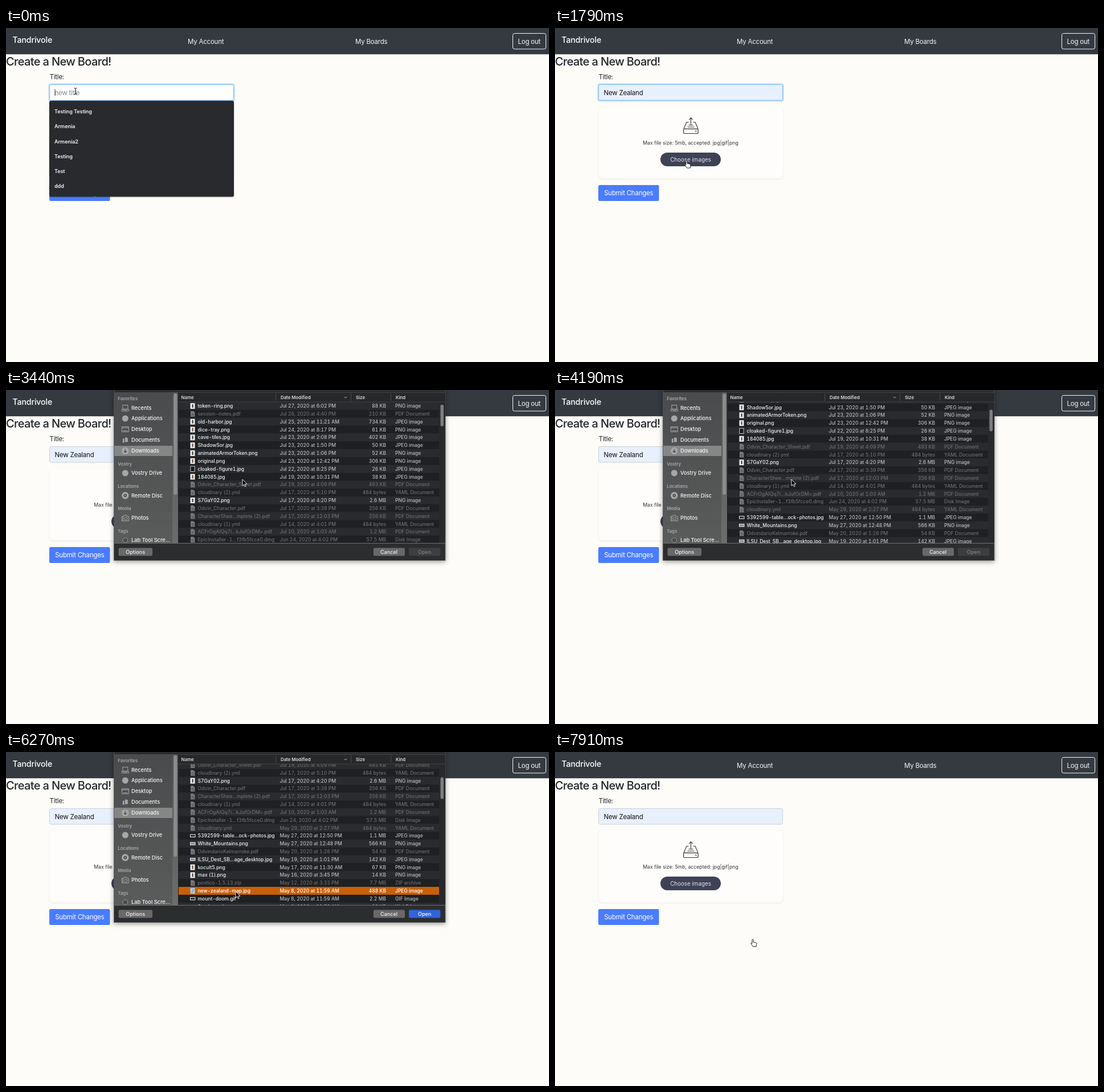
Animation, 953 px wide and 587 px high, one loop 8 s. Source, as an HTML page:

```html
<!DOCTYPE html>
<html lang="en">
<head>
<meta charset="utf-8">
<title>Create a New Board</title>
<style>
  html, body { margin: 0; width: 100%; height: 100%; overflow: hidden; background: #fdfcf8; }
  svg { display: block; width: 100vw; height: 100vh; }
  text { font-family: Inter, Roboto, sans-serif; font-optical-sizing: none; white-space: pre; }
  .ui { font-size: 11.5px; letter-spacing: -.22px; }
  .brand { font-size: 14.1px; font-weight: 500; letter-spacing: -.1px; }
  .head { font-size: 20px; font-weight: 500; letter-spacing: -.64px; }
  .note { font-size: 8.7px; }
  .pill { font-size: 9.8px; }
  .opt { font-size: 9px; font-weight: 600; letter-spacing: -.05px; }
  .side { font-size: 9.2px; font-weight: 500; }
  .sec { font-size: 7.8px; font-weight: 600; }
  .col { font-size: 7.8px; font-weight: 600; }
  .row { font-size: 8.55px; font-weight: 500; font-variant-numeric: tabular-nums; letter-spacing: -.03px; }
  .btn { font-size: 9.1px; font-weight: 500; }
  #dialog { filter: drop-shadow(0 2px 4px rgba(0, 0, 0, .4)); }
  #card { filter: drop-shadow(0 1px 1.5px rgba(0, 0, 0, .08)); }
</style>
</head>
<body>
<svg id="stage" viewBox="0 0 953 587" preserveAspectRatio="none"></svg>
<script>
const LOOP = 8000, TICK = 149.2, ROW = 13.82, TOP = 21.3, PICKED = 27;
const stage = document.getElementById('stage');
const $ = id => document.getElementById(id);

const rect = (x, y, w, h, fill, extra = '') =>
  `<rect x="${x}" y="${y}" width="${w}" height="${h}" fill="${fill}" ${extra}/>`;
const line = (d, color, width = 1, extra = '') =>
  `<path d="${d}" fill="none" stroke="${color}" stroke-width="${width}" ${extra}/>`;
const fade = (id, from, to) =>
  `<linearGradient id="${id}" x2="0" y2="1"><stop stop-color="${from}"/><stop offset="1" stop-color="${to}"/></linearGradient>`;
const sizes = { ui: 11.5, brand: 14.1, head: 20, note: 8.7, pill: 9.8, opt: 9, side: 9.2, sec: 7.8, col: 7.8, row: 8.55, btn: 9.1 };
// Text placed by the vertical centre of its capitals
const text = (x, cy, str, cls, fill, extra = '') =>
  `<text x="${x}" y="${(cy + sizes[cls] * .36).toFixed(2)}" class="${cls}" fill="${fill}" ${extra}>${str}</text>`;
const MID = 'text-anchor="middle"', END = 'text-anchor="end"';

const files = `board-draft.png|Jul 28|9:14 AM|1.3 MB
token-ring.png|Jul 27|6:02 PM|88 KB
session-notes.pdf|Jul 26|4:40 PM|210 KB
old-harbor.jpg|Jul 25|11:21 AM|734 KB
dice-tray.png|Jul 24|8:17 PM|61 KB
cave-tiles.jpg|Jul 23|2:08 PM|402 KB
ShadowSor.jpg|Jul 23|1:50 PM|50 KB
animatedArmorToken.png|Jul 23|1:06 PM|52 KB
original.png|Jul 23|12:42 PM|306 KB
cloaked-figure1.jpg|Jul 22|8:25 PM|26 KB
184085.jpg|Jul 19|10:31 PM|38 KB
Odvin_Character_Sheet.pdf|Jul 19|4:09 PM|493 KB
cloudinary (2).yml|Jul 17|5:10 PM|484 bytes
S7GaY02.png|Jul 17|4:20 PM|2.6 MB
Odvin_Character.pdf|Jul 17|3:39 PM|356 KB
CharacterShee…mplete (2).pdf|Jul 17|12:03 PM|356 KB
cloudinary (1).yml|Jul 14|4:01 PM|484 bytes
ACFrOgAIQq7i…kJufOrDM=.pdf|Jul 10|1:03 AM|1.2 MB
EpicInstaller-1…f3fb5fcce0.dmg|Jun 24|4:02 PM|57.5 MB
cloudinary.yml|May 29|2:27 PM|484 bytes
5392599-table…ock-photos.jpg|May 27|12:50 PM|1.1 MB
White_Mountains.png|May 27|12:48 PM|566 KB
OdvindarioKelmarroke.pdf|May 20|1:28 PM|54 KB
ILSU_Dest_SB…age_desktop.jpg|May 19|1:01 PM|142 KB
kocult5.png|May 17|11:30 AM|67 KB
max (1).png|May 16|3:45 PM|14 KB
postico-1.5.13.zip|May 12|3:33 PM|7.7 MB
new-zealand-map.jpg|May 8|11:59 AM|488 KB
mount-doom.gif|May 8|11:59 AM|2.2 MB
Sender.webp|May 8|11:59 AM|66 KB`.split('\n').map(s => s.split('|'));

const kinds = {
  jpg: 'JPEG image', png: 'PNG image', gif: 'GIF Image', webp: 'WebP image',
  pdf: 'PDF Document', yml: 'YAML Document', dmg: 'Disk Image', zip: 'ZIP archive'
};

function fileIcon(i, cy, isImage) {
  if (!isImage)
    return `<path d="M324 ${cy - 5}h5l2.5 2.5v7.5h-7.5z" fill="#77787b"/>` +
      line(`M325.5 ${cy}h4.5m-4.5 2.5h4.5`, '#47484b', .8);
  if (i === PICKED) return rect(323.5, cy - 5, 8, 10, '#a9cdea') + line(`M329 ${cy - 3}l-1 3-2 3`, '#6d93b5', 1.3);
  if (i > 19 && i < 24 || i > 27)
    return rect(323, cy - 2.7, 9.5, 5.4, '#eee') + rect(324, cy - 1.6, 7.5, 3.2, i % 2 ? '#7c8c98' : '#2a2422');
  return rect(323.5, cy - 5, 8, 10, '#f1f1f1') +
    (i === 9 ? rect(324.3, cy - 4.2, 6.4, 8.4, '#17181a') : rect(326.5, cy - 3, 2.2, 6, i % 2 ? '#3d3d40' : '#6b4a3c'));
}

function fileRow([name, day, time, size], i) {
  const cy = TOP + 7 + i * ROW, ext = name.split('.').pop();
  const isImage = /jpg|png|gif|webp/.test(ext), mark = i === PICKED ? ' data-sel="1"' : '';
  const main = isImage ? '#f0f0f0' : '#6b6c6f', sub = isImage ? '#b9babd' : '#6b6c6f';
  const cell = (x, str, fill, extra = '') => text(x, cy, str, 'row', fill, extra + mark);
  return fileIcon(i, cy, isImage) + cell(336.5, name, main) +
    cell(480.5, `${day}, 2020 at ${time}`, sub) + cell(667, size, sub, END) + cell(683, kinds[ext], sub);
}

const icons = {
  recents: '<path d="M-4.5-5h9v7h-9zM-6 2.5h3l1 1.5h4l1-1.5h3v3h-12z"/>',
  dot: '<circle r="5.5" fill="currentColor" stroke="none"/>',
  desktop: '<path d="M-6-4.5h12v9h-12zM-6-2.5h12M-4 2.5h8"/>',
  docs: '<path d="M-5-3h4v8h-4zM-1-5h4l2 2v7h-6z" fill="currentColor" stroke="#3c3d3f" stroke-width=".7"/>',
  down: '<circle r="6.2" fill="currentColor" stroke="none"/><path d="M0-3.5v6m-2.5-2.3l2.5 2.5 2.5-2.5" stroke="#48494b" stroke-width="1.3"/>',
  disc: '<circle r="6.2" fill="currentColor" stroke="none"/><circle r="2" fill="none" stroke="#3a3b3d" stroke-width="1.4"/>',
  camera: '<path d="M-6-3h3l1-2h4l1 2h3v8h-12zM-4-3v8"/><circle cy="1" cx="1" r="2.5"/>',
  tag: '<circle r="4.3" stroke-width=".8" fill="#4b4b4c"/>'
};
const places = [
  [31.5, 'Recents', 'recents'], [50, 'Applications', 'dot'], [69, 'Desktop', 'desktop'],
  [88, 'Documents', 'docs'], [107, 'Downloads', 'down'], [146, 'Vostry Drive', 'dot'],
  [185.5, 'Remote Disc', 'disc'], [225, 'Photos', 'camera'], [264, 'Lab Tool Scre…', 'tag']
];
const sections = [[15.5, 'Favorites'], [130, 'Vostry'], [169.5, 'Locations'], [208.5, 'Media'], [248, 'Tags']];

const page = () =>
  rect(0, 0, 953, 587, '#fdfcf8') + rect(0, 0, 953, 46.2, '#353a41') +
  text(11.5, 20.5, 'Tandrivole', 'brand', '#fff') +
  text(319, 23.5, 'My Account', 'ui', '#f4f5f5') + text(613, 23.5, 'My Boards', 'ui', '#f4f5f5') +
  rect(889.5, 9.5, 58, 27.5, 'none', 'rx="3" stroke="#f8f9fa"') + text(918.3, 23.5, 'Log out', 'ui', '#f8f9fa', MID) +
  text(0, 59, 'Create a New Board!', 'head', '#212529') + text(76.5, 85.5, 'Title:', 'ui', '#212529') +
  rect(75.4, 98.4, 325.4, 29.8, 'none', 'id="ring" rx="3.5" stroke="#bfdeff" stroke-width="2.2"') +
  rect(76.5, 99.5, 323, 27.5, '#fff', 'id="field" rx="2.8"') +
  text(85.5, 113.5, '', 'ui', '#111', 'id="value"') +
  line('M0 107.5v11.5', '#222', .9, 'id="caret"') +
  `<g id="card">${rect(76.5, 138, 323.5, 126.5, '#fefdfc', 'rx="7"')}</g>` +
  line('M226 177l5-11.5h3.5m8 0h3.5l5 11.5M238.5 170v-12m-3.3 3.2l3.3-3.3 3.3 3.3M234.5 170.8h8M232.5 174h12', '#333', 1.1) +
  rect(225.6, 177.3, 25.6, 8.2, 'none', 'rx="1.5" stroke="#333" stroke-width="1.2"') +
  '<circle cx="247.3" cy="181.3" r="1.1" fill="none" stroke="#333" stroke-width=".7"/>' +
  text(238, 202, 'Max file size: 5mb, accepted: jpg|gif|png', 'note', '#333', MID) +
  rect(185, 219, 106, 24, '#3f4156', 'rx="12"') + text(238, 231, 'Choose images', 'pill', '#e4e4ea', MID) +
  rect(76, 276, 106.5, 28, '#4a7cff', 'rx="2.8"') + text(129.3, 290.3, 'Submit Changes', 'ui', '#fff', MID);

const menu = (id, items, hover) => {
  const h = 12 + items.length * 26.1;
  return `<g id="${id}">` + rect(75.5, 129, 325, h + .5, '#000', 'rx="3" opacity=".18"') +
    rect(76, 127.8, 324, h, '#292a2d', 'rx="3"') +
    (hover ? rect(76, 134, 324, 26, '#45464a', 'id="hover"') : '') +
    items.map((s, i) => text(85, 147 + i * 26.15, s, 'opt', '#f3f3f3')).join('') + '</g>';
};

const columns = () =>
  [['Date Modified', 493, 484.5], ['Size', 625, 616.5], ['Kind', 695, 686.5]]
    .map(([s, x, bar]) => text(x, 13, s, 'col', '#dcdcdc') + line(`M${bar} 6v13`, '#515254', .8)).join('') +
  line('M604.8 11.8l2.3 2.3 2.3-2.3', '#bbb');

const dialog = () => '<g id="dialog">' + fade('sideFade', '#4a4b4c', '#5a5b5b') + fade('stripFade', '#555656', '#6b6c6c') +
  rect(189.5, -10, 581.5, 309.5, '#2c2d2e', 'stroke="#58595a" stroke-width=".8"') +
  rect(190, 4, 112, 265, '#343536', 'id="sidebar"') + rect(292, 4, 10.5, 265, '#3a3b3c', 'id="strip"') +
  rect(294.3, 6, 6, 178, '#8c8d8e', 'rx="3"') +
  rect(190, 98, 102, 18, '#585959', 'id="current"') +
  '<clipPath id="sideClip"><rect x="190" y="4" width="112" height="265"/></clipPath><g clip-path="url(#sideClip)">' +
  sections.map(([y, s]) => text(196.3, y, s, 'sec', '#a8a9aa')).join('') +
  '<g id="places">' + places.map(([y, s, icon]) =>
    `<g transform="translate(209.3 ${y})" color="#a6a7a8" fill="none" stroke="currentColor">${icons[icon]}</g>` +
    text(220, y, s, 'side', 'currentColor')).join('') + '</g></g>' +
  '<clipPath id="listClip"><rect x="302.5" y="21" width="468.5" height="248"/></clipPath>' +
  '<g clip-path="url(#listClip)"><g id="list">' +
  files.concat([[], []]).map((_, i) => rect(302.5, TOP + i * ROW, 468.5, ROW + .1, i % 2 ? '#292b2f' : '#1e2023')).join('') +
  rect(302.5, TOP + PICKED * ROW, 457.5, ROW, '#c96008', 'id="highlight"') +
  `<g id="files">${files.map(fileRow).join('')}</g></g>` +
  '<g id="scrollbar">' + rect(760, 21, 11, 248, '#28292b') + rect(762.5, 24, 5.6, 38, '#7d7e80', 'id="thumb" rx="2.8"') + '</g></g>' +
  rect(302.5, 4, 468.5, 17, '#27282a') + line('M302.5 21h468.5M302.5 4.5h468.5', '#47484a', .8) +
  line('M302.5 4v265', '#17181a', .8) +
  text(307.5, 13, 'Name', 'col', '#dcdcdc') + `<g id="columns">${columns()}</g>` +
  line('M190 269.3h581', '#747577') +
  rect(197.5, 277.5, 59.5, 14, '#69696a', 'rx="2.5"') + text(227.2, 284.5, 'Options', 'btn', '#f2f2f2', MID) +
  rect(645, 277.5, 55, 14, '#69696a', 'rx="2.5"') + text(672, 284.5, 'Cancel', 'btn', '#f2f2f2', MID) +
  rect(707, 277.5, 55.5, 14, '#3d3e3f', 'id="open" rx="2.5"') + text(734.7, 284.5, 'Open', 'btn', '#808182', `${MID} id="openText"`) +
  '</g>';

const cursors = () =>
  '<g id="beam">' + line('M-2.5-5.5q2.5 0 2.5 1.5q0-1.5 2.5-1.5M0-4v8m-2.5 1.5q2.5 0 2.5-1.5q0 1.5 2.5 1.5', '#111') + '</g>' +
  '<path id="arrow" d="M0 0v11.3l2.6-2.4 1.7 3.9 1.8-.8-1.7-3.8h3.6z" fill="#000" stroke="#fff" stroke-width=".9"/>' +
  '<path id="hand" d="M-1.1 1.2a1.1 1.1 0 0 1 2.2 0v3.8l4.6 1.2q1.4.4 1.3 1.8l-.7 3v2h-5.7l-3.6-5q-.6-1.6 1-1.4l.9.9z" fill="#fff" stroke="#111" stroke-width=".9"/>';

stage.innerHTML = page() +
  menu('menuAll', ['Testing Testing', 'Armenia', 'Armenia2', 'Testing', 'Test', 'ddd']) +
  menu('menuMatch', ['New Zealand', 'New Zealand2'], true) + dialog() + cursors();

const set = (id, attrs) => { for (const k in attrs) $(id).setAttribute(k, attrs[k]); };
const show = (id, on) => set(id, { display: on ? 'inline' : 'none' });
const hold = (keys, n) => keys.reduce((v, [at, next]) => n >= at ? next : v, keys[0][1]);

// Pointer moves: start tick, end tick, x, y
const moves = [
  [0, 0, 122, 111], [4, 6, 118, 144], [9, 12, 231, 233], [16, 18, 246, 230], [18, 21, 415, 157],
  [37, 40, 403, 245], [42, 48, 739, 283], [50, 53, 347, 329]
];
function pointer(n) {
  let x = 122, y = 111;
  for (const [a, b, tx, ty] of moves) {
    const u = Math.min(1, Math.max(0, b > a ? (n - a) / (b - a) : 1)), e = u * u * (3 - 2 * u);
    x += (tx - x) * e;
    y += (ty - y) * e;
  }
  return [x, y];
}

const values = [[0, ''], [1, 'N'], [2, 'Ne'], [5, 'New Zealand']];
const scrolls = [[0, 0], [23, 14], [24, 36], [26, 58], [28, 80.7], [30, 110], [34, 135], [37, 157.4]];
const slides = [[0, -330], [16, -160], [17, 0], [50, -166.7], [51, -330]];
const pickedCells = [...document.querySelectorAll('[data-sel]')];
pickedCells.forEach(cell => cell.dataset.fill = cell.getAttribute('fill'));

function draw(n) {
  const typed = hold(values, n), focused = n < 14, filled = n >= 5;
  $('value').textContent = typed || 'new title';
  set('value', { fill: typed ? '#111' : '#868c92' });
  set('field', { fill: filled ? '#e8f0fe' : '#fefefc', stroke: focused ? '#80bdff' : '#c8d0da' });
  show('ring', focused);
  show('caret', n < 5);
  set('caret', { transform: `translate(${86 + (typed ? $('value').getComputedTextLength() : 0)} 0)` });
  show('menuAll', n < 1);
  show('menuMatch', n >= 1 && n < 7);
  show('hover', filled);

  const active = n >= 19, loaded = n >= 20, picked = n >= 42, scroll = hold(scrolls, n), slide = hold(slides, n);
  show('dialog', slide > -320);
  set('dialog', { transform: `translate(0 ${slide})` });
  set('sidebar', { fill: active ? 'url(#sideFade)' : '#343536' });
  set('strip', { fill: active ? 'url(#stripFade)' : '#3a3b3c' });
  set('current', { fill: active ? '#858686' : '#585959' });
  set('places', { color: active ? '#f6f6f6' : '#a9aaab' });
  show('files', loaded);
  show('scrollbar', loaded);
  show('highlight', picked);
  set('columns', { transform: `translate(${loaded ? -11 : 0} 0)` });
  set('list', { transform: `translate(0 ${-scroll})` });
  set('thumb', { y: 24 + scroll / 7.7 });
  for (const cell of pickedCells) cell.setAttribute('fill', picked ? '#fff' : cell.dataset.fill);
  set('open', { fill: !picked ? '#3d3e3f' : n === 49 ? '#2450b8' : '#3163dc' });
  set('openText', { fill: picked ? '#fff' : '#808182' });

  const [x, y] = pointer(n), kind = n < 1 ? 'beam' : n < 5 ? '' : n >= 12 && n < 16 || n >= 53 ? 'hand' : 'arrow';
  for (const id of ['beam', 'arrow', 'hand']) {
    show(id, id === kind);
    set(id, { transform: `translate(${x.toFixed(1)} ${y.toFixed(1)})` });
  }
}

const start = performance.now();
function frame() {
  const t = (performance.now() - start) % LOOP;
  draw(Math.floor(t / TICK + .05));
  requestAnimationFrame(frame);
}
frame();
</script>
</body>
</html>
```
